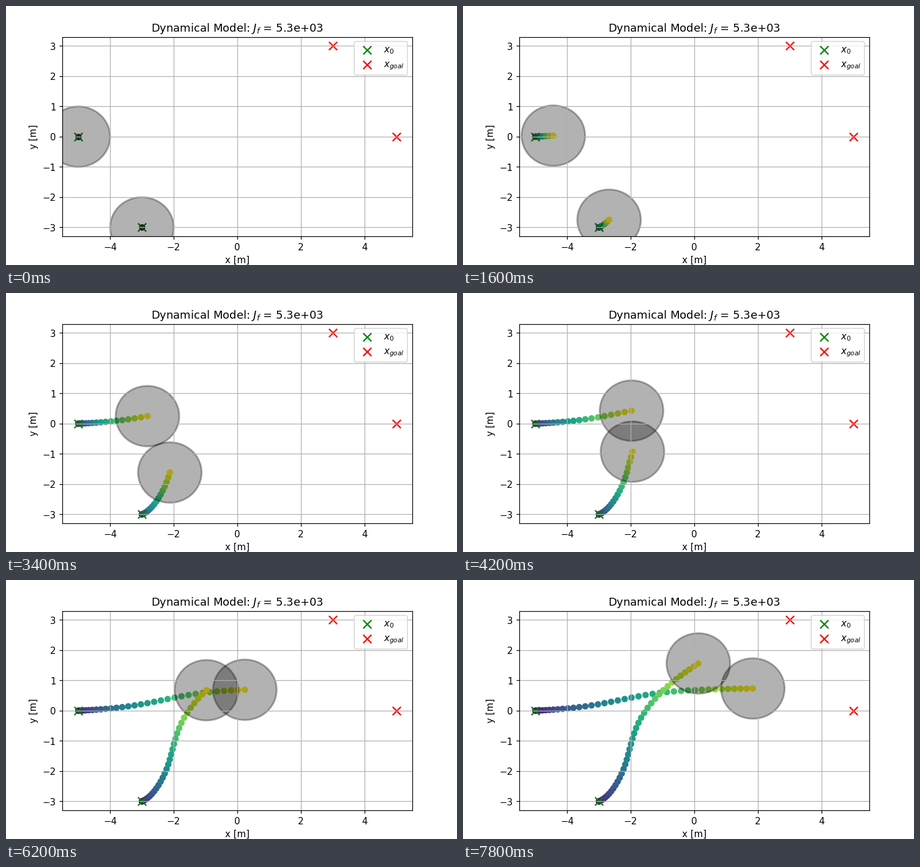
A matplotlib script that plays this animation: 737x424 px, repeating every 8 s.

```python
import numpy as np
import matplotlib.pyplot as plt
from matplotlib.animation import FuncAnimation
from matplotlib.patches import Circle

W, H, DPI = 737.4, 424.35, 108  # the canvas rounds down to whole pixels
FRAMES, STEP_MS, LEG = 40, 200, 8

STARTS = [(-5, 0), (-3, -3)]
GOALS = [(5, 0), (3, 3)]

# Where each agent is after every LEG steps
VIA = [
    [(-4.433, 0.035), (-3.03, 0.21), (-1.31, 0.555), (0.45, 0.7), (2.034, 0.737)],
    [(-2.68, -2.747), (-2.17, -1.776), (-1.756, -0.402), (-0.836, 0.807), (0.266, 1.66)],
]


def spline(points):
    """Cubic spline that leaves the first point from rest, one row per step."""
    p = np.array(points, float)
    n = len(p)
    a = 4 * np.eye(n) + np.eye(n, k=1) + np.eye(n, k=-1)
    a[0, 1] = 0
    a[-1, -1] = 2
    rhs = np.zeros_like(p)
    rhs[1:-1] = 3 * (p[2:] - p[:-2])
    rhs[-1] = 3 * (p[-1] - p[-2])
    m = np.linalg.solve(a, rhs)

    i, rest = np.divmod(np.arange(FRAMES), LEG)
    u = rest[:, None] / LEG
    return ((1 + 2 * u) * (1 - u) ** 2 * p[i] + u * (1 - u) ** 2 * m[i]
            + u ** 2 * (3 - 2 * u) * p[i + 1] + u ** 2 * (u - 1) * m[i + 1])


paths = [spline([start] + via) for start, via in zip(STARTS, VIA)]

fig, ax = plt.subplots(figsize=(W / DPI, H / DPI), dpi=DPI)
ax.set(xlim=(-5.5, 5.5), ylim=(-3.3, 3.3), xlabel="x [m]", ylabel="y [m]",
       title="Dynamical Model: $J_f$ = 5.3e+03")
ax.grid()

trails = [ax.scatter([], []) for _ in paths]
for spots, color, name in [(STARTS, "g", "$x_0$"), (GOALS, "r", "$x_{goal}$")]:
    ax.scatter(*zip(*spots), s=80, c=color, marker="x", label=name)
discs = [ax.add_patch(Circle(p[0], 1, color="k", alpha=0.3, lw=2)) for p in paths]
ax.legend(loc="upper right")


def draw(step):
    colors = plt.cm.viridis(np.linspace(0, 1, step + 1))
    for path, trail, disc in zip(paths, trails, discs):
        trail.set_offsets(path[:step + 1])
        trail.set_facecolor(colors)
        trail.set_edgecolor(colors)
        disc.center = path[step]
    return trails + discs


anim = FuncAnimation(fig, draw, frames=FRAMES, interval=STEP_MS,
                     init_func=lambda: draw(0), repeat=True, repeat_delay=0)
plt.show()
```
